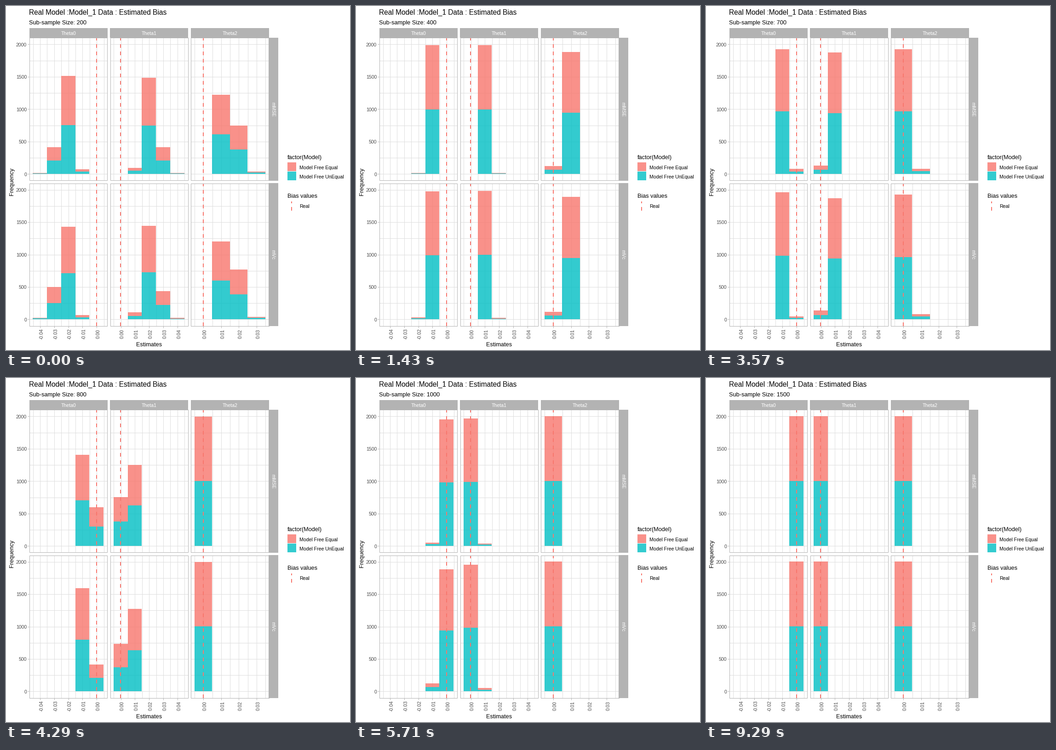
Recreate the animation shown at these times as a matplotlib script. Size 748x748 px, loop 10000 ms.

```python
import math

import matplotlib.pyplot as plt
from matplotlib.animation import FuncAnimation
from matplotlib.collections import LineCollection, PolyCollection
from matplotlib.patches import Rectangle

SIZE, DPI = 748, 100
PX = 72 / DPI                      # points per pixel
CORAL, TEAL = "#F8766D", "#00BFC4"
GRID, GREY, DARK = "#DEDEDE", "#B3B3B3", "#4D4D4D"
BIG, MID, SMALL = 15.5, 12.8, 10.5

LOOP, STEPS, TICK = 10000, 14, 50  # loop and tick in ms

PANEL_W, PANEL_H = 169.4, 310
PAD_X, PAD_Y = PANEL_W / 22, PANEL_H / 22
# name, left edge, first bin, number of bins
COLS = [("Theta0", 50.95, -4, 5), ("Theta1", 226.6, 0, 5), ("Theta2", 402.4, 0, 4)]
ROWS = [("mMSE", 69.4), ("mVc", 385.5)]
DRAWS = 2000
UNIT = (PANEL_H - 2 * PAD_Y) / DRAWS

# Log-normal bias per panel: median (in bins) and spread at sample size 200,
# and the power of the size by which the median shrinks.
BIAS = [
    [(2.136, 0.196, 1.010), (2.119, 0.206, 1.018), (1.387, 0.28, 1.025)],
    [(2.190, 0.203, 1.005), (2.130, 0.215, 1.019), (1.398, 0.28, 1.030)],
]

fig = plt.figure(figsize=(SIZE / DPI, SIZE / DPI), dpi=DPI, facecolor="white")
ax = fig.add_axes([0, 0, 1, 1])
ax.set_xlim(0, SIZE)
ax.set_ylim(SIZE, 0)
ax.axis("off")


def text(x, y, s, size, color="black", ha="left", va="baseline", rot=0):
    return ax.text(x, y, s, fontsize=size * PX, color=color, ha=ha, va=va,
                   rotation=rot, family="Liberation Sans")


def box(x, y, w, h, z=1, **kw):
    ax.add_patch(Rectangle((x, y), w, h, zorder=z, **kw))


def lines(segs, color, z):
    ax.add_collection(LineCollection(segs, colors=color, linewidths=PX, zorder=z,
                                     capstyle="butt", snap=True))


def dashes(x, bottom, top):
    ax.plot([int(x)] * 2, [bottom, top], color=CORAL, lw=2 * PX, ls=(0, (4, 4)),
            dash_capstyle="butt", zorder=4, snap=True)


def bin_edge(col, k):
    _, x, low, n = COLS[col]
    return x + PAD_X + (k - low) * (PANEL_W - 2 * PAD_X) / n


def level(row, count):
    return ROWS[row][1] + PANEL_H - PAD_Y - count * UNIT


def draw_panel(col, row):
    _, x, low, n = COLS[col]
    y = ROWS[row][1]
    right, bottom = x + PANEL_W, y + PANEL_H
    grid = [[(x, level(row, v)), (right, level(row, v))]
            for v in range(0, DRAWS + 1, 250)]
    for i in range(2 * n + 1):
        gx = bin_edge(col, low + i / 2)
        grid.append([(gx, y), (gx, bottom)])
    lines(grid, GRID, 1)
    dashes(bin_edge(col, 0.5), bottom, y)
    box(x, y, PANEL_W, PANEL_H, 5, fill=False, ec=GREY, lw=PX)


def draw_static():
    text(50, 19, "Real Model :Model_1 Data : Estimated Bias", BIG)
    for c, (name, x, low, n) in enumerate(COLS):
        box(x - 0.4, 48, PANEL_W + 0.8, 21.4, fc=GREY, lw=0)
        text(x + PANEL_W / 2, 63, name, SMALL, "white", "center")
        for r in range(2):
            draw_panel(c, r)
        ticks = [bin_edge(c, k + 0.5) for k in range(low, low + n)]
        lines([[(t, 695.5), (t, 699.5)] for t in ticks], GREY, 1)
        for k, t in zip(range(low, low + n), ticks):
            text(t + 3.3, 713, f"{k / 100:.2f}", SMALL, DARK, "center", "center", 90)
    for r, (name, y) in enumerate(ROWS):
        box(571.3, y - 0.4, 20.7, PANEL_H + 0.8, fc=GREY, lw=0)
        text(580.5, y + PANEL_H / 2, name, SMALL, "white", "center", "center", -90)
        for v in range(0, DRAWS + 1, 500):
            ty = level(r, v)
            lines([[(47, ty), (50.5, ty)]], GREY, 1)
            text(45, ty + 4.2, str(v), SMALL, DARK, "right")
    text(311, 740, "Estimates", MID, ha="center")
    text(13, 382, "Frequency", MID, ha="center", va="center", rot=90)


def draw_legend():
    text(612, 333, "factor(Model)", MID)
    for y, color, name in [(340, CORAL, "Model Free Equal"),
                           (360, TEAL, "Model Free UnEqual")]:
        box(612, y, 19, 19, fc=color, alpha=0.8, lw=0)
        text(638, y + 15, name, SMALL)
    text(612, 417, "Bias values", MID)
    dashes(621.5, 445, 424.6)
    text(638, 439, "Real", SMALL)


def counts(row, col, size):
    """Return {bin: number of draws} for one panel at a sample size."""
    median, spread, power = BIAS[row][col]
    ratio = 200 / size
    median *= ratio ** power
    spread *= math.sqrt(ratio)

    def below(v):
        if v <= 0:
            return 0
        return 0.5 + 0.5 * math.erf(math.log(v / median) / spread / math.sqrt(2))

    _, _, low, n = COLS[col]
    bins = {k: round(DRAWS * (below(abs(k) + 0.5) - below(abs(k) - 0.5)))
            for k in range(low, low + n)}
    return {k: count for k, count in bins.items() if count >= 5}


def bar(col, row, k, start, end):
    x0, x1 = int(bin_edge(col, k)), int(bin_edge(col, k + 1))
    y0 = int(level(row, start))
    y1 = min(int(level(row, end)), y0 - 1)
    return [(x0, y0), (x1, y0), (x1, y1), (x0, y1)]


def make_bars(color):
    bars = PolyCollection([], facecolors=color, alpha=0.8, linewidths=0,
                          antialiaseds=False, zorder=3)
    ax.add_collection(bars, autolim=False)
    return bars


draw_static()
draw_legend()
lower, upper = make_bars(TEAL), make_bars(CORAL)
subtitle = text(50, 39.5, "", MID)


def draw(i):
    # a change that falls within a tick shows from its start
    step = int((i * TICK + 0.9 * TICK) * STEPS / LOOP)
    size = 200 + 100 * step
    low, high = [], []
    for row in range(len(ROWS)):
        for col in range(len(COLS)):
            for k, total in counts(row, col, size).items():
                low.append(bar(col, row, k, 0, total / 2))
                high.append(bar(col, row, k, total / 2, total))
    lower.set_verts(low)
    upper.set_verts(high)
    subtitle.set_text(f"Sub-sample Size: {size}")
    return lower, upper, subtitle


anim = FuncAnimation(fig, draw, frames=LOOP // TICK, interval=TICK,
                     init_func=lambda: draw(0), repeat=True, repeat_delay=0)
plt.show()
```
